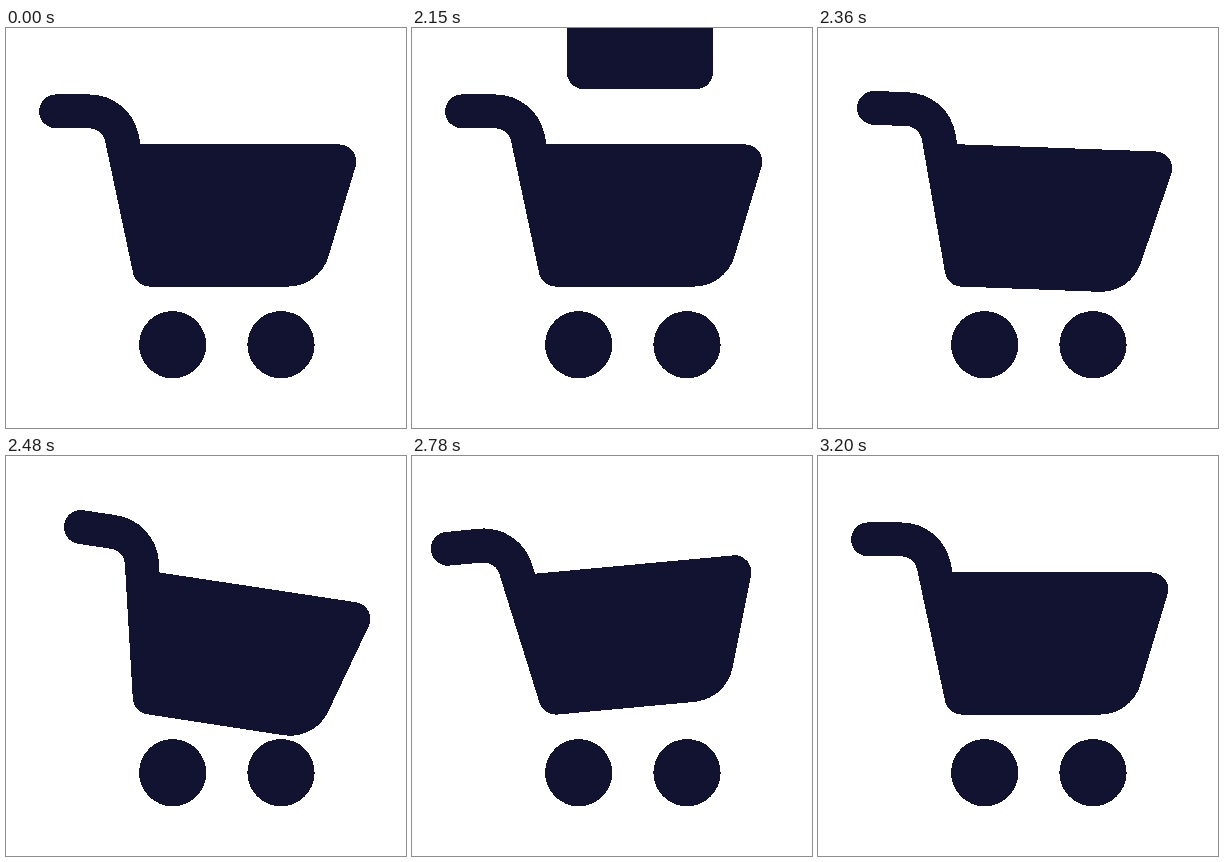
Recreate the animation shown at these times as an HTML page with a canvas. Size 400 px wide and 400 px high, loop 3230 ms.

```html
<!DOCTYPE html>
<html lang="en">
<head>
<meta charset="utf-8">
<title>Cart</title>
<style>
  html, body { margin: 0; width: 100%; height: 100%; overflow: hidden; background: #fff; }
  canvas { display: block; width: 400px; height: 400px; }
</style>
</head>
<body>
<canvas id="stage" width="400" height="400"></canvas>
<script>
const SIZE = 400;
const UNIT = SIZE / 24; // shapes are laid out on a 24-unit grid
const LOOP = 3230;
const INK = [18, 19, 49];
const EDGE = 50; // minimum alpha that counts as ink

const ctx = document.getElementById("stage").getContext("2d", { willReadFrequently: true });

// Closed polygon with a radius at each corner: [x, y, radius].
function roundedShape(corners) {
  const path = new Path2D();
  const [x0, y0] = corners[0];
  const [xn, yn] = corners[corners.length - 1];
  path.moveTo((x0 + xn) / 2, (y0 + yn) / 2);
  corners.forEach(([x, y, r], i) => {
    const [nx, ny] = corners[(i + 1) % corners.length];
    path.arcTo(x, y, nx, ny, r);
  });
  path.closePath();
  return path;
}

const cart = roundedShape([
  [2, 4, 1], [7.425, 4, 3], [8.065, 7, 0],
  [21.345, 7, 1], [18.79, 15.5, 2.5],
  [7.813, 15.5, 1], [5.795, 6, 1], [2, 6, 1]
]);

function fillWheel(x) {
  ctx.beginPath();
  ctx.arc(x, 19, 2, 0, Math.PI * 2);
  ctx.fill();
}

function fillBox(top) {
  ctx.beginPath();
  ctx.roundRect(9.3, top, 8.75, 6, 1);
  ctx.fill();
}

const smooth = p => (1 - Math.cos(Math.PI * p)) / 2;
const sineOut = p => Math.sin(Math.PI / 2 * p);

function tween(t, start, end, from, to, ease) {
  const p = Math.min(1, Math.max(0, (t - start) / (end - start)));
  return from + (to - from) * ease(p);
}

// Tilt in degrees: forward on impact, back, then settle.
function tilt(t) {
  if (t < 2570) return tween(t, 2275, 2570, 0, 10.9, smooth);
  if (t < 2840) return tween(t, 2570, 2840, 10.9, -7.4, smooth);
  return tween(t, 2840, 3210, -7.4, 0, sineOut);
}

// Turns soft edges into hard ones.
function hardenEdges() {
  const image = ctx.getImageData(0, 0, SIZE, SIZE);
  const data = image.data;
  for (let i = 0; i < data.length; i += 4) {
    const solid = data[i + 3] > EDGE;
    if (solid) data.set(INK, i);
    data[i + 3] = solid ? 255 : 0;
  }
  ctx.putImageData(image, 0, 0);
}

function draw(t) {
  ctx.clearRect(0, 0, SIZE, SIZE);
  ctx.fillStyle = `rgb(${INK})`;
  ctx.save();
  ctx.scale(UNIT, UNIT);
  fillWheel(10);
  fillWheel(16.5);

  ctx.translate(8.64, 14.5);
  ctx.rotate(tilt(t) * Math.PI / 180);
  ctx.translate(-8.64, -14.5);
  ctx.fill(cart);
  fillBox(tween(t, 2030, 2390, -6, 8.37, smooth));
  ctx.restore();
  hardenEdges();
}

const start = performance.now();
function frame() {
  draw((performance.now() - start) % LOOP);
  requestAnimationFrame(frame);
}
frame();
</script>
</body>
</html>
```
